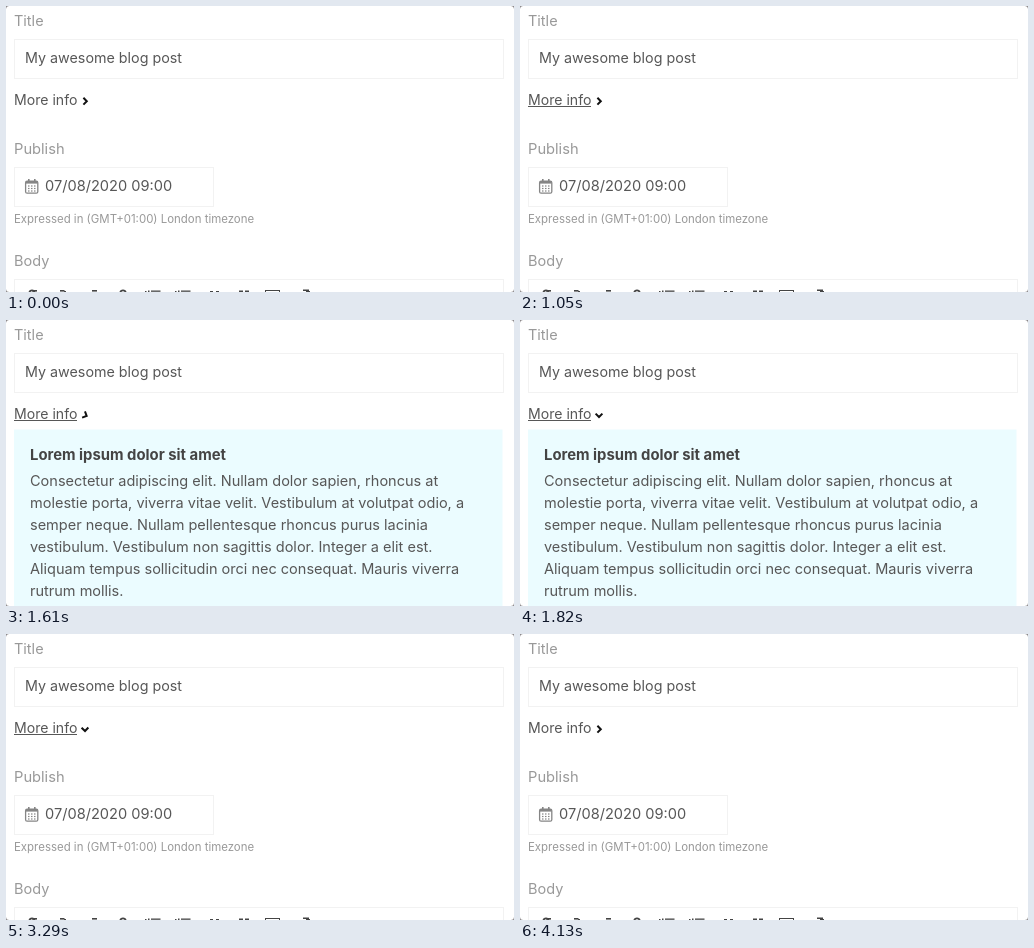
Animation, 508 px wide and 286 px high, one loop 4480 ms. Source, as an HTML page with a canvas:

```html
<!DOCTYPE html>
<html lang="en">
<head>
<meta charset="utf-8">
<title>Form with expandable info</title>
<style>
html, body { margin: 0; width: 100%; height: 100%; overflow: hidden; background: #fff; }
canvas { display: block; width: 508px; height: 286px; }
</style>
</head>
<body>
<canvas id="stage"></canvas>
<script>
const W = 508, H = 286, LOOP = 4480, TICK = 70;
const DARK = '#444', INK = '#575757', GREY = '#999', LINE = '#f2f2f2';
const canvas = document.getElementById('stage');
const ctx = canvas.getContext('2d');
const dpr = window.devicePixelRatio || 1;
canvas.width = W * dpr;
canvas.height = H * dpr;

const INFO = [
  'Consectetur adipiscing elit. Nullam dolor sapien, rhoncus at',
  'molestie porta, viverra vitae velit. Vestibulum at volutpat odio, a',
  'semper neque. Nullam pellentesque rhoncus purus lacinia',
  'vestibulum. Vestibulum non sagittis dolor. Integer a elit est.',
  'Aliquam tempus sollicitudin orci nec consequat. Mauris viverra',
  'rutrum mollis.'
];

function text(str, x, y, color = INK, size = 14.5, weight = 400) {
  ctx.font = `${weight} ${size}px Inter, Roboto, sans-serif`;
  ctx.fillStyle = color;
  ctx.fillText(str, x, y);
}

function rect(x, y, w, h, color) {
  ctx.fillStyle = color;
  ctx.fillRect(x, y, w, h);
}

function box(x, y, w, h, color = LINE) {
  ctx.strokeStyle = color;
  ctx.lineWidth = 1;
  ctx.strokeRect(x + .5, y + .5, w - 1, h - 1);
}

function path(points, color, width) {
  ctx.beginPath();
  points.forEach(([x, y]) => ctx.lineTo(x, y));
  ctx.strokeStyle = color;
  ctx.lineWidth = width;
  ctx.stroke();
}

// Standard "ease" curve: cubic-bezier(.25, .1, .25, 1)
function ease(x) {
  if (x <= 0) return 0;
  if (x >= 1) return 1;
  const bez = (u, a, b) => 3 * u * (1 - u) ** 2 * a + 3 * u * u * (1 - u) * b + u ** 3;
  let lo = 0, hi = 1;
  for (let i = 0; i < 24; i++) {
    const mid = (lo + hi) / 2;
    if (bez(mid, .25, .25) < x) lo = mid; else hi = mid;
  }
  return bez(lo, .1, 1);
}

function chevron(turn) {
  ctx.save();
  ctx.translate(79, 95.2);
  ctx.rotate(turn * Math.PI / 2);
  path([[-1.6, -3.4], [1.8, 0], [-1.6, 3.4]], '#111', 2);
  ctx.restore();
}

function calendar() {
  const c = '#858585';
  ctx.beginPath();
  ctx.roundRect(19.6, 175.2, 12.2, 12, 1.5);
  ctx.strokeStyle = c;
  ctx.lineWidth = 1.3;
  ctx.stroke();
  rect(20, 175, 11.5, 2.6, c);
  rect(22, 173, 1.6, 3, c);
  rect(28, 173, 1.6, 3, c);
  for (let row = 0; row < 3; row++)
    for (let col = 0; col < 3; col++)
      rect(22 + col * 3, 179.4 + row * 2.5, 1.5, 1.2, c);
}

function arc(x, y, r) {
  ctx.beginPath();
  ctx.arc(x, y, r, Math.PI, 0);
  ctx.strokeStyle = DARK;
  ctx.lineWidth = 1.8;
  ctx.stroke();
}

// Only the tops of the toolbar icons are inside the view
function toolbar() {
  box(8, 273, 490, 30);
  arc(26, 287, 2.6);
  rect(26, 284, 5, 1.6, DARK);
  rect(54, 284, 4.5, 1.6, DARK);
  rect(58, 285, 2, 1, DARK);
  rect(86, 284, 5, 1.6, DARK);
  arc(117, 287, 2.7);
  for (const x of [139, 169]) {
    rect(x, 285, 1.5, 1, DARK);
    rect(x + 3, 284.5, 1.5, 1.5, DARK);
    rect(x + 6, 284.5, 9.5, 1.3, DARK);
  }
  rect(204, 285, 3, 1, DARK);
  rect(210, 285, 3, 1, DARK);
  rect(233, 284.5, 4, 1.5, DARK);
  rect(239, 284.5, 4, 1.5, DARK);
  box(259, 284, 15, 12, DARK);
  rect(297, 283.5, 6, 1.5, DARK);
  rect(300, 285, 4, 1, DARK);
}

function corners() {
  ctx.beginPath();
  ctx.rect(0, 0, W, H);
  ctx.roundRect(0, 0, W, H, 3.5);
  ctx.fillStyle = '#8d898b';
  ctx.fill('evenodd');
}

function draw(t) {
  ctx.setTransform(dpr, 0, 0, dpr, 0, 0);
  rect(0, 0, W, H, '#fff');

  text('Title', 8, 20, GREY);
  box(8, 33, 490, 40);
  text('My awesome blog post', 19, 57, INK, 14.3);
  text('More info', 8, 99, INK, 14.1);
  if (t >= 1050 && t < 4130) rect(8, 100, 63, 1, INK);

  const now = Math.floor(t / TICK) * TICK;
  chevron(ease((now - 1572) / 200) - ease((now - 3285) / 200));

  if (t >= 1610 && t < 3290) {
    rect(8, 109.5, 488.5, 176.5, '#ebfcff');
    text('Lorem ipsum dolor sit amet', 24, 140, DARK, 14.85, 700);
    INFO.forEach((line, i) => text(line, 24, 166 + i * 22, INK, 14.53));
  } else {
    text('Publish', 8, 148, GREY, 14.7);
    box(8, 161, 200, 40);
    calendar();
    text('07/08/2020 09:00', 39, 185, INK, 14.6);
    text('Expressed in (GMT+01:00) London timezone', 8, 217, GREY, 11.45);
    text('Body', 8, 260, GREY, 14.5);
    toolbar();
  }
  corners();
}

const start = performance.now();
function frame() {
  draw((performance.now() - start) % LOOP);
  requestAnimationFrame(frame);
}
frame();
</script>
</body>
</html>
```
